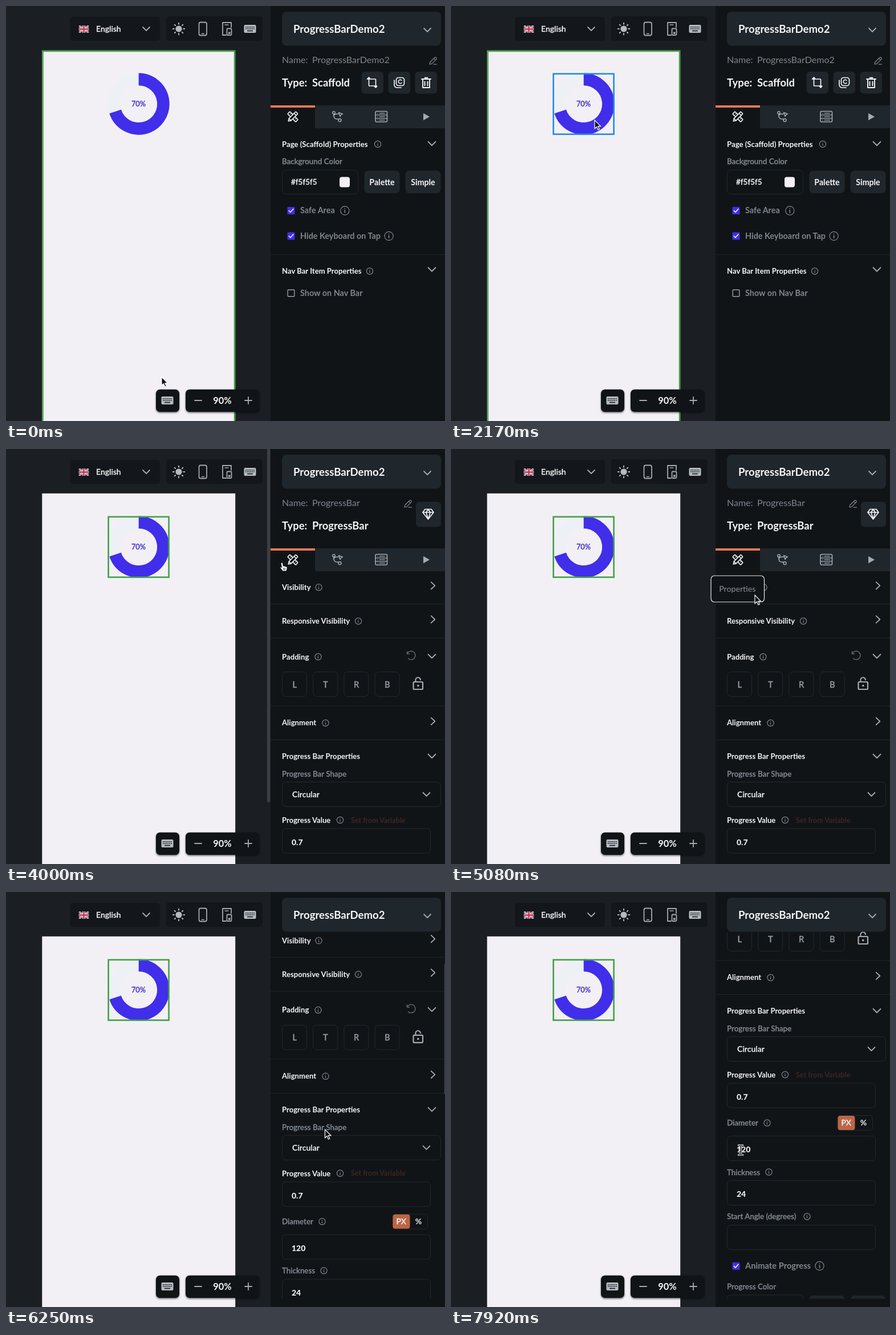
An HTML page that plays this animation: 770 px wide and 727 px high, repeating every 8 s.

```html
<!DOCTYPE html>
<html lang="en">
<head>
<meta charset="utf-8">
<title>Progress bar editor</title>
<style>
html, body { margin: 0; width: 100%; height: 100%; overflow: hidden; background: #1b1f23; }
svg { display: block; width: 770px; height: 727px; font-family: Lato, "Open Sans", sans-serif; }
text { white-space: pre; }
</style>
</head>
<body>
<svg id="stage" viewBox="0 0 770 727" xmlns="http://www.w3.org/2000/svg"></svg>
<script>
const LOOP = 8000;
const SELECT_AT = 2900;
const PANEL = '#111417', RAISED = '#1f262c', EDGE = '#24282c', RULE = '#202428';
const WHITE = '#f4f5f6', GRAY = '#7e868e', ICON = '#a3abb2', VIOLET = '#402eea';
const GREEN = '#42a046', BLUE = '#218be4';

// Drawing helpers; text is placed by its vertical centre. Medium weight gets a hairline outline.
const text = (x, y, s, size = 13.1, weight = 700, fill = WHITE, anchor = 'start') =>
  `<text x="${x}" y="${y + size * .34}" font-size="${size}" font-weight="${weight}" fill="${fill}" text-anchor="${anchor}"` +
  `${weight === 500 ? ` stroke="${fill}" stroke-width=".3"` : ''}>${s}</text>`;
const box = (x, y, w, h, r, fill, stroke = 'none', sw = 1) =>
  `<rect x="${x}" y="${y}" width="${w}" height="${h}" rx="${r}" fill="${fill}" stroke="${stroke}" stroke-width="${sw}"/>`;
const line = (d, stroke = ICON, w = 1.6, x = 0, y = 0) =>
  `<path transform="translate(${x} ${y})" d="${d}" fill="none" stroke="${stroke}" stroke-width="${w}" stroke-linecap="round" stroke-linejoin="round"/>`;
const shape = (d, fill, x = 0, y = 0) => `<path transform="translate(${x} ${y})" d="${d}" fill="${fill}"/>`;
const group = (body, attrs = '') => `<g ${attrs}>${body}</g>`;
const down = (x, y, s = 6.5) => line(`M${-s} ${-s / 2}L0 ${s / 2}L${s} ${-s / 2}`, ICON, 1.8, x, y);
const right = (x, y) => line('M-3.3-6.2L3.3 0L-3.3 6.2', ICON, 1.8, x, y);
const rule = y => `<path d="M464 ${y + .5}H770" stroke="${RULE}"/>`;
const label = (y, s) => text(484, y, s, 13.4, 500, '#848d95');
const field = (y, s = '', w = 260) => box(484.5, y + .5, w, 43, 6, PANEL, EDGE) + text(501, y + 24.5, s, 14, 800);

function info(x, y, r = 5.6) {
  return `<circle cx="${x}" cy="${y}" r="${r}" fill="none" stroke="${GRAY}" stroke-width="1.2"/>` +
    line(`M0 ${-r * .1}V${r * .45}M0 ${-r * .48}v.1`, GRAY, r > 6 ? 1.6 : 1.2, x, y);
}

function check(y, s, on, size = 14.4) {
  const mark = on
    ? box(493.5, y - 6.5, 13, 13, 1, VIOLET) + line('M-3.8 0L-1.2 2.8L4-3', WHITE, 1.6, 500, y)
    : box(494.2, y - 5.8, 11.6, 11.6, 1, 'none', '#9aa1a7', 1.4);
  return mark + text(516, y, s, size, 700, GRAY);
}

function keyboard(x, y) {
  let keys = '';
  for (let r = 0; r < 2; r++)
    for (let c = 0; c < 6; c++) keys += box(x - 8 + c * 2.8, y - 4 + r * 3, 1.7, 1.7, 0, '#24292e');
  return box(x - 10.5, y - 7, 21, 14, 2, '#b4bbc1') + keys + box(x - 5, y + 2.6, 10, 1.8, 0, '#24292e');
}

const pencil = (x, y) =>
  line('M-6 6l.8-3.7L3-5.8a1.5 1.5 0 0 1 2.2 0l.7.7a1.5 1.5 0 0 1 0 2.2L-2.3 5.3zM1.4-4.2l3 3M1 6.2h5.5', GRAY, 1.2, x, y);

function flag() {
  return group(
    box(127.5, 34, 18, 13, 1, '#26366f') +
    '<path d="M127.5 34l18 13M145.5 34l-18 13" stroke="#e9e9ee" stroke-width="2.8"/>' +
    '<path d="M127.5 34l18 13M145.5 34l-18 13" stroke="#c8313f" stroke-width="1"/>' +
    '<path d="M136.5 34v13M127.5 40.5h18" stroke="#f0f0f3" stroke-width="4.4"/>' +
    '<path d="M136.5 34v13M127.5 40.5h18" stroke="#cc2f3d" stroke-width="2.4"/>', 'clip-path="url(#flagClip)"');
}

function sun(x, y) {
  let rays = '';
  for (let i = 0; i < 8; i++) {
    const a = i * Math.PI / 4, c = Math.cos(a), s = Math.sin(a);
    rays += `M${(c * 8.3).toFixed(1)} ${(s * 8.3).toFixed(1)}L${(c * 10.2).toFixed(1)} ${(s * 10.2).toFixed(1)}`;
  }
  return `<circle cx="${x}" cy="${y}" r="5.6" fill="#b4bbc1"/>` + line(rays, '#b4bbc1', 2, x, y);
}

function toolbar() {
  return box(112, 19, 158, 42, 5, '#13161a') + flag() + text(158, 40, 'English', 14, 500) + down(246, 40, 6) +
    box(281, 18, 169, 43, 5, '#13161a') + sun(303, 40) +
    box(338.5, 28.5, 13.5, 23, 3, 'none', ICON, 1.8) + line('M-2 0h4', ICON, 1.5, 345.3, 48.5) +
    line('M-1 11H-7V-11H8V-3', ICON, 1.8, 387, 40) + line('M-3-7h6', ICON, 1.3, 387, 40) +
    box(387.5, 39.5, 8, 11.5, 1.5, 'none', ICON, 1.8) + box(390, 45.5, 3.5, 3.5, 0, ICON) +
    keyboard(428, 40);
}

function ring() {
  const cx = 232.7, cy = 171.6, r = 43.2, a = .7 * 2 * Math.PI;
  const ex = cx + r * Math.sin(a), ey = cy - r * Math.cos(a);
  return `<circle cx="${cx}" cy="${cy}" r="${r}" fill="none" stroke="#edf0f5" stroke-width="21.6"/>` +
    `<path d="M${cx} ${cy - r}A${r} ${r} 0 1 1 ${ex} ${ey}" fill="none" stroke="${VIOLET}" stroke-width="21.6"/>` +
    text(232.5, 171.7, '70%', 12.8, 500, '#4030c8', 'middle');
}

function canvas() {
  const frame = id => `<rect id="${id}" x="179.6" y="118.8" width="106" height="105.8" fill="none" stroke-width="2.6"/>`;
  return box(63.3, 77.8, 338.9, 660, 0, '#f2f0f4') + ring() +
    `<rect id="pageFrame" x="64.5" y="79" width="336.5" height="670" fill="none" stroke="${GREEN}" stroke-width="2.4"/>` +
    frame('ringFrame') +
    group(box(263, 671.7, 41, 39.3, 7, '#111417') + box(315, 671.7, 129.5, 39.3, 7, '#111417'), 'filter="url(#soft)"') +
    keyboard(283, 691) + line('M-6 0h12', ICON, 1.8, 337, 691) + line('M-6 0h12M0-6v12', ICON, 1.8, 425, 691) +
    text(379.5, 691.5, '90%', 16.4, 700, WHITE, 'middle') +
    `<rect id="canvasBar" x="458" y="-4" width="5.5" height="623" rx="2.7" fill="#3b3f44"/>`;
}

function tabs() {
  return box(542, 174.2, 228, 40, 0, RAISED) + box(464, 174, 78, 4, 0, '#ec7850') +
    // crossed ruler and pencil
    group(box(-10, -2.8, 20, 5.6, 1, PANEL, WHITE, 1.6) + line('M-6-2v2M-2-2v2M2-2v2M6-2v2', WHITE, 1),
      'transform="translate(503 194) rotate(45)"') +
    group(box(-7, -2.6, 17, 5.2, 1, PANEL, WHITE, 1.6) + line('M-7-2.6L-11 0L-7 2.6M6-2.6v5.2', WHITE, 1.5),
      'transform="translate(503 194) rotate(-45)"') +
    // branch
    line('M-6-4V0a5 5 0 0 0 5 5H2M-6 0C-6-4-2-4 2-4', ICON, 1.6, 581, 193) +
    `<circle cx="575" cy="187" r="2.2" fill="none" stroke="${ICON}" stroke-width="1.5"/>` +
    `<circle cx="585.5" cy="200" r="2.5" fill="none" stroke="${ICON}" stroke-width="1.5"/>` +
    line('M0 0l7 2.6-3 1.4-1.4 3z', ICON, 1.5, 583.5, 186.5) +
    // table
    box(648, 184.5, 20.5, 18.5, 2, 'none', ICON, 1.6) +
    line('M-10-3h20M-10 3h20M-6.5-6h.2M-6.5 0h.2M-6.5 6h.2M-3-6h9M-3 0h9M-3 6h9', ICON, 1.3, 658.2, 193.8) +
    shape('M-5-6.2L6 0L-5 6.2z', ICON, 737, 194);
}

function pagePanel() {
  const button = x => box(x, 115, 38.5, 38.5, 6, RAISED);
  const colorButton = (x, s) => box(x, 288.5, 62, 39.5, 7, RAISED) + text(x + 31, 308.8, s, 14.2, 700, WHITE, 'middle');
  return text(537, 95, 'ProgressBarDemo2', 16, 400, GRAY) + pencil(749, 96) +
    text(537, 134.5, 'Scaffold', 18.4) + button(623.5) + button(670.5) + button(717.5) +
    line('M-6-9V5a1 1 0 0 0 1 1H8M-9-6H5a1 1 0 0 1 1 1V9M-8-7l2-2 2 2M4 7l2 2 2-2', WHITE, 1.7, 642.5, 134) +
    box(684.5, 125.5, 14, 14, 4, 'none', WHITE, 1.7) + line('M-6.5-4.5v8a5 5 0 0 0 5 5h7', WHITE, 1.7, 687.5, 134.5) +
    line('M2.3-2.2a3.2 3.2 0 1 0 0 4.4', WHITE, 1.6, 691.5, 132.5) +
    line('M-8-6.5H8M-2.5-8.8h5M-6-6.5V8.5H6V-6.5M-2.5-2V5M2.5-2V5', WHITE, 1.9, 737, 134.5) +
    text(484, 242.3, 'Page (Scaffold) Properties', 13.2) + info(652, 242) + down(747, 241) +
    label(272.3, 'Background Color') + box(484.5, 287.5, 133, 42, 6, PANEL, EDGE) +
    text(500, 308.8, '#f5f5f5', 13.5, 500) + box(585, 299.5, 18, 18, 4, '#f2f0f4') +
    colorButton(628.5, 'Palette') + colorButton(700.5, 'Simple') +
    check(358.5, 'Safe Area', true) + info(594.3, 358.5, 7.6) +
    check(403, 'Hide Keyboard on Tap', true) + info(671.6, 403, 7.6) + rule(435) +
    text(484, 464.8, 'Nav Bar Item Properties') + info(638, 464.5) + down(747, 461.5) +
    check(503, 'Show on Nav Bar', false);
}

function barPanel() {
  const closed = (y, s, ix) => text(484, y, s) + info(ix, y) + right(749, y - 3);
  const sides = [...'LTRB'].map((s, i) => box(484.5 + i * 54.2, 390.5, 43, 43, 6, PANEL, EDGE) +
    text(506.2 + i * 54.2, 412.5, s, 14.8, 500, '#969ea5', 'middle')).join('');
  return text(537, 95, 'ProgressBar', 16, 400, GRAY) + pencil(705, 96) + text(537, 134.5, 'ProgressBar', 18.4) +
    box(719, 92.5, 44, 44, 6, RAISED) +
    line('M-5.5-8.5h11L9.5-3L0 9L-9.5-3zM-9.5-3h19M-3.6-3L0 9L3.6-3L0-8.5z', WHITE, 1.7, 740.5, 114) +
    closed(242.3, 'Visibility', 548.5) + rule(271) +
    closed(301.5, 'Responsive Visibility', 618) + rule(330.5) +
    text(484, 364.2, 'Padding', 13.2) + info(547.5, 364) + down(747, 363) +
    line('M-7.5-6.5V-2.5H-3.5M-7.3-2.7A7.4 7.4 0 1 1-5.5 5.5', '#5c636a', 1.6, 711, 361.5) +
    sides + box(714.5, 408, 16.5, 13, 1.5, 'none', ICON, 2.2) +
    line('M-4.3-4V-7a4.3 4.3 0 0 1 8.6 0', ICON, 2.1, 722.7, 411.5) + box(721, 412.8, 3.6, 3.6, 1.8, ICON) +
    rule(449.5) + closed(480, 'Alignment', 560.5) + rule(509) +
    text(484, 539, 'Progress Bar Properties') + down(747, 538) +
    label(569.3, 'Progress Bar Shape') + box(484.5, 583.5, 278, 43, 6, PANEL, EDGE) +
    text(502, 605.3, 'Circular', 14.1, 500) + down(737.5, 605, 6) +
    text(484, 650.3, 'Progress Value') + info(586, 650) + text(605, 650.3, 'Set from Variable', 12.5, 700, '#3c2620') +
    field(664.5, '0.7') +
    label(734.5, 'Diameter') + info(554.5, 734.5) + box(678.5, 721.5, 61, 26, 5, PANEL, EDGE) +
    box(678.5, 722, 30, 25, 4, '#bd6547') + text(693.3, 734.7, 'PX', 14, 500, WHITE, 'middle') +
    text(723.5, 734.7, '%', 14, 700, WHITE, 'middle') + field(757, '120') +
    label(821, 'Thickness') + info(557.5, 820.5) + field(835, '24') +
    label(898.8, 'Start Angle (degrees)') + info(624.5, 898.5) + field(913) +
    check(985.3, 'Animate Progress', true, 14.7) + info(646.5, 985, 7.6) + label(1021.3, 'Progress Color') +
    box(484.5, 1036, 133, 42, 6, PANEL, EDGE) + box(628.5, 1037, 62, 40, 7, RAISED) + box(700.5, 1037, 62, 40, 7, RAISED);
}

function sidebar() {
  return box(464, 0, 306, 727, 0, PANEL) +
    group(group(text(484, 95, 'Name:', 16, 400, GRAY) + text(484, 134.5, 'Type:', 18.4) + tabs() +
      group(pagePanel(), 'id="pagePanel"') + group(barPanel(), 'id="barPanel"'), 'id="list"'), 'clip-path="url(#view)"') +
    box(484, 10, 279, 59.5, 8, RAISED) + text(504, 40.5, 'ProgressBarDemo2', 18.6) + down(739, 42, 6) +
    '<rect id="listBar" x="768.8" width="4" height="229" rx="1" fill="#3f4449"/>' +
    group(box(456, 222, 93.5, 46, 6, PANEL, '#e6e8ea', 1.2) + text(502.3, 245, 'Properties', 14.2, 400, '#8b9298', 'middle'), 'id="tip"');
}

function cursors() {
  const arrow = '<path d="M0 0V14.6L3.4 11.5L5.9 17L8.3 16L5.8 10.6H10.4z" fill="#08090a" stroke="#fff" stroke-width="1.2"/>';
  const hand = '<path d="M-2 0C-1-2 1.4-1.6 1.6.2L2.4 4.6L7.4 5.6C9.6 6.2 9.7 7.6 9.2 9.6L8 14H1L-3 8.4C-4 6.6-2.4 5.6-1 7L-.6 7.3z" fill="#f2f2f2" stroke="#08090a" stroke-width="1.1"/>' +
    '<path d="M3 8v4M5.2 8v4" stroke="#08090a" stroke-width=".8"/>';
  const beam = 'M-3.6-8.5Q0-8.5 0-6V6Q0 8.5-3.6 8.5M3.6-8.5Q0-8.5 0-6V6Q0 8.5 3.6 8.5M-2.2 3H2.2';
  return group(group(arrow, 'id="arrow"') + group(hand, 'id="hand"') +
    group(line(beam, '#f4f4f4', 3.2) + line(beam, '#08090a', 1.2), 'id="beam"'), 'id="cursor"');
}

document.getElementById('stage').innerHTML =
  `<defs><clipPath id="view"><rect x="464" y="69.5" width="306" height="643"/></clipPath>
  <clipPath id="flagClip"><rect x="127.5" y="34" width="18" height="13" rx="1.5"/></clipPath>
  <filter id="soft" x="-20%" y="-40%" width="140%" height="180%" color-interpolation-filters="sRGB">
  <feDropShadow dx="0" dy="1.5" stdDeviation="1.8" flood-color="#000" flood-opacity=".6"/></filter></defs>` +
  box(0, 0, 770, 727, 0, '#1b1f23') + toolbar() + canvas() + sidebar() + cursors();

const el = id => document.getElementById(id);
const clamp = v => Math.max(0, Math.min(1, v));
const smooth = v => v * v * (3 - 2 * v);
const fade = (t, from, to, ms = 150) => clamp((t - from) / ms) * clamp((to - t) / ms);
const show = (id, on) => el(id).setAttribute('display', on ? 'inline' : 'none');

const path = [
  [0, 273, 650], [900, 273, 650], [1980, 252, 200], [3250, 252, 200], [3850, 484, 200],
  [4400, 484, 200], [5000, 533, 256], [5120, 533, 256], [5600, 559.5, 416], [7250, 559.5, 416], [7750, 508, 452]
];
const scrollKeys = [[5670, 0], [5750, 8.5], [6250, 157], [6650, 240], [7300, 330]];

function along(keys, t, ease) {
  if (t <= keys[0][0]) return keys[0].slice(1);
  for (let i = 1; i < keys.length; i++) {
    const a = keys[i - 1], b = keys[i];
    if (t < b[0]) {
      const k = ease((t - a[0]) / (b[0] - a[0]));
      return a.slice(1).map((v, j) => v + (b[j + 1] - v) * k);
    }
  }
  return keys[keys.length - 1].slice(1);
}

// Pointer style follows whatever lies beneath it.
function pointer(x, y, scroll) {
  const ly = y + scroll, within = (top, h) => ly > top && ly < top + h;
  if (x < 466 || y < 70) return 'arrow';
  if (within(174, 40) || within(584, 43)) return 'hand';
  if (x < 484 || x > 745) return 'arrow';
  if (within(390, 44) && (x - 484) % 54.2 < 44 && x < 691) return 'beam';
  return [664, 757, 835, 913].some(top => within(top, 44)) ? 'beam' : 'arrow';
}

function update(t) {
  const [x, y] = along(path, t, smooth);
  const [scroll] = along(scrollKeys, t, v => v);
  const selected = t >= SELECT_AT;
  const hover = x > 179 && x < 287 && y > 118 && y < 226;

  show('pageFrame', !selected);
  show('pagePanel', !selected);
  show('barPanel', selected);
  show('ringFrame', selected || hover);
  el('ringFrame').setAttribute('stroke', selected ? GREEN : BLUE);

  el('list').setAttribute('transform', `translate(0 ${-scroll})`);
  el('listBar').setAttribute('y', 70 + scroll * .355);
  el('listBar').setAttribute('opacity', fade(t, 5640, 7850, 100));
  el('canvasBar').setAttribute('opacity', fade(t, 3480, 4550));
  el('tip').setAttribute('opacity', fade(t, 4350, 5330));

  const kind = pointer(x, y, scroll);
  ['arrow', 'hand', 'beam'].forEach(id => show(id, id === kind));
  el('cursor').setAttribute('transform', `translate(${x} ${y})`);
}

function tick(now) {
  update(now % LOOP);
  requestAnimationFrame(tick);
}
update(0);
requestAnimationFrame(tick);
</script>
</body>
</html>
```
